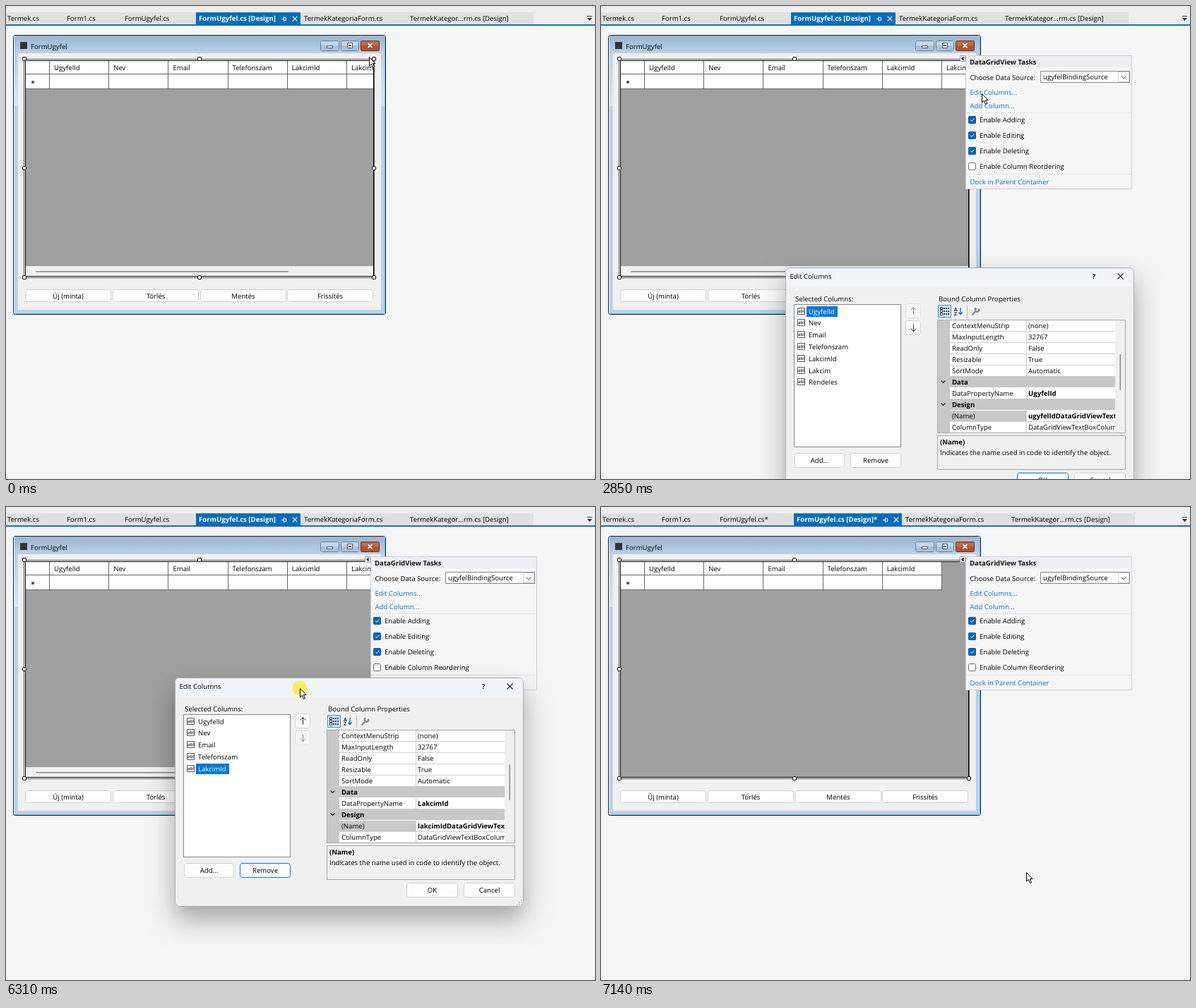
An HTML page with a canvas that plays this animation: 834 px wide and 671 px high, repeating every 7480 ms.

```html
<!DOCTYPE html>
<html>
<head>
<meta charset="utf-8">
<style>
html, body { margin: 0; width: 100%; height: 100%; overflow: hidden; background: #f5f5f5; }
canvas { display: block; }
</style>
</head>
<body>
<canvas id="stage" width="834" height="671"></canvas>
<script>
const g = document.getElementById('stage').getContext('2d');
const LOOP = 7480, STEP = 70;
const BLUE = '#006cbe', LINK = '#0f6cc4', FACE = '#f0f0f0';

// start time, number of steps, end point
const MOVES = [
  [70, 2, 510, 76], [1080, 4, 533, 129], [1560, 1, 536, 127], [1760, 1, 539, 124],
  [2920, 4, 430, 301], [3250, 9, 316, 513], [4060, 6, 368, 642],
  [5550, 4, 426, 418], [5830, 3, 438, 386], [6170, 5, 411, 226],
  [6520, 3, 571, 469], [6730, 3, 602, 518]
];
const CLICKS = [[470, 610], [2490, 2630], [3850, 3990], [4610, 4750], [5150, 5350], [6170, 6520], [6940, 7080]];
const COLUMNS = ['UgyfelId', 'Nev', 'Email', 'Telefonszam', 'LakcimId', 'Lakcim', 'Rendeles'];

const within = (t, a, b) => t >= a && t < b;

function fill(x, y, w, h, color, r = 0) {
  g.fillStyle = color;
  g.beginPath();
  g.roundRect(x, y, w, h, r);
  g.fill();
}

function box(x, y, w, h, color, border, r = 0) {
  if (color) fill(x, y, w, h, color, r);
  g.strokeStyle = border;
  g.lineWidth = 1;
  g.beginPath();
  g.roundRect(x + .5, y + .5, w - 1, h - 1, r);
  g.stroke();
}

function path(points, stroke, width = 1, color = null) {
  g.beginPath();
  for (let i = 0; i < points.length; i += 2) g.lineTo(points[i], points[i + 1]);
  if (color) { g.closePath(); g.fillStyle = color; g.fill(); }
  if (stroke) { g.strokeStyle = stroke; g.lineWidth = width; g.stroke(); }
}

// y is the middle of the capitals
function text(s, x, y, color = '#000', weight = 400, align = 'left') {
  g.font = `${weight} 9.6px "Open Sans", "Noto Sans", sans-serif`;
  g.textAlign = align;
  g.fillStyle = color;
  g.fillText(s, x, Math.round(y + 3.5));
}

function button(s, x, y, w, h, border = '#d0d0d0', color = '#fdfdfd', ink = '#000') {
  box(x, y, w, h, color, border, 3);
  text(s, x + w / 2, y + h / 2, ink, 400, 'center');
}

function cross(x, y, r, color, width = 1.2) {
  path([x - r, y - r, x + r, y + r], color, width);
  path([x + r, y - r, x - r, y + r], color, width);
}

function clipped(x, y, w, h, draw) {
  g.save();
  g.beginPath();
  g.rect(x, y, w, h);
  g.clip();
  draw();
  g.restore();
}

function pointer(t) {
  let x = 514, y = 72;
  for (const [start, steps, toX, toY] of MOVES) {
    if (t < start) break;
    const k = Math.min(steps, Math.floor((t - start) / STEP) + 1);
    const p = Math.sin(k / steps * Math.PI / 2);
    x += (toX - x) * p;
    y += (toY - y) * p;
  }
  return [Math.round(x), Math.round(y)];
}

function tabs(saved) {
  const star = saved ? '' : '*', left = saved ? 269 : 273, end = saved ? 417 : 426, shift = end - 417;
  fill(0, 0, 834, 28, '#eeeef0');
  fill(0, 9, 747 + shift, 17, '#e0e0e1');
  fill(0, 26, 834, 2, '#1672bd');
  fill(left, 9, end - left, 18, BLUE);
  text('Termek.cs', 2, 17.5);
  text('Form1.cs', 86, 17.5);
  text('FormUgyfel.cs' + star, 168, 17.5);
  text('FormUgyfel.cs [Design]' + star, left + 4, 17.5, '#fff', 700);
  text('TermekKategoriaForm.cs', 422 + shift, 17.5);
  text('TermekKategor...rm.cs [Design]', 572 + shift, 17.5);
  const pin = end - 27;
  path([pin, 18.5, pin + 3, 18.5], '#fff');
  path([pin + 3.5, 15, pin + 3.5, 22], '#fff');
  box(pin + 3, 16, 4, 5, null, '#fff');
  cross(end - 8, 18, 3.3, '#fff');
  fill(823, 14, 7, 1, '#333');
  path([823, 17, 830, 17, 826.5, 21], null, 1, '#333');
}

function handle(x, y) {
  box(x - 3, y - 3, 6, 6, '#fff', '#000', 1.5);
}

function form(t, saved) {
  const side = g.createLinearGradient(0, 41, 0, 142);
  side.addColorStop(0, '#98b4d1');
  side.addColorStop(.26, '#bcd1e8');
  side.addColorStop(1, '#d8e6f4');
  box(10, 41, 528, 397, '#b9d1ea', '#222', 3);
  fill(11, 42, 526, 100, side);
  fill(11, 44, 1, 392, '#e4f0fa');
  fill(536, 44, 1, 393, '#45cde8');
  fill(12, 436, 525, 1, '#45cde8');
  fill(17, 67, 514, 364, FACE);
  fill(20, 51, 10, 10, '#333');
  text('FormUgyfel', 35, 57);
  box(445, 49, 27, 15, '#c4d7eb', '#667d96', 2);
  box(474, 49, 26, 15, '#c4d7eb', '#667d96', 2);
  box(502, 49, 27, 15, '#c9683f', '#58302a', 2);
  fill(446, 56, 25, 7, '#a9c2dd');
  fill(475, 56, 24, 7, '#a9c2dd');
  fill(503, 56, 25, 7, '#b6512b');
  box(454, 56, 9, 4, '#fff', '#445');
  box(483, 52, 8, 8, '#fff', '#445');
  fill(485, 55, 4, 2, '#445');
  cross(515.5, 56, 3, '#444', 3.4);
  cross(515.5, 56, 3, '#fff', 1.8);

  box(25, 75, 497, 311, '#fff', '#555');
  box(27, 77, 494, 307, '#a0a0a0', '#000');
  const right = saved ? 520 : 483;
  fill(28, 78, right - 28, 40, '#fff');
  fill(28, 96, right - 28, 1, '#666');
  fill(28, 117, right - 28, 1, '#666');
  for (let i = 0; i < 6; i++) fill(Math.round(61 + i * 84.2), 78, 1, 40, '#666');
  clipped(28, 78, 492, 40, () => {
    COLUMNS.slice(0, saved ? 6 : 5).forEach((s, i) => text(s, 68 + i * 84.2, 87));
  });
  for (let a = 0; a < 3; a++) {
    const c = Math.cos(a * Math.PI / 3) * 2.5, s = Math.sin(a * Math.PI / 3) * 2.5;
    path([38 - c, 108 - s, 38 + c, 108 + s], '#222', 1);
  }
  if (saved) {
    fill(28, 369, 492, 14, FACE);
    fill(42, 376, 358, 1.5, '#858585', 1);
  }
  for (const x of [26, 274, 521.5]) for (const y of [75, 230, 385])
    if (x !== 274 || y !== 230) handle(Math.floor(x), y);
  if (t >= 70) {
    box(508, 70, 8, 9, '#fff', '#999');
    path([513.5, 71.5, 513.5, 77.5, 510, 74.5], null, 1, '#000');
  }
  [['Új (minta)', 27], ['Törlés', 151], ['Mentés', 275], ['Frissítés', 398]]
    .forEach(([s, x]) => button(s, x, 402, 122, 18));
}

function tasks(t) {
  box(516, 70, 236, 190, '#f6f6f7', '#cccedb');
  fill(517, 71, 234, 16, '#eeeef2');
  text('DataGridView Tasks', 522, 79, '#111', 700);
  text('Choose Data Source:', 522.5, 101);
  box(622, 92, 127, 17, '#fff', '#868686');
  box(732, 93, 16, 15, '#fff', '#d0d0d0');
  text('ugyfelBindingSource', 626, 100);
  path([736.5, 99.5, 740, 103, 743.5, 99.5], '#444');
  const hover = within(t, 1290, 2630);
  text('Edit Columns...', 522.5, 122.5, hover ? '#111' : LINK);
  if (hover) fill(523, 128, 67, 1, '#111');
  text('Add Column...', 522.5, 141, LINK);
  fill(517, 151, 234, 1, '#e2e3ea');
  ['Adding', 'Editing', 'Deleting', 'Column Reordering'].forEach((s, i) => {
    const y = 161 + i * 22;
    box(520, y - 5, 11, 11, i < 3 ? '#0062b8' : '#fff', i < 3 ? '#0062b8' : '#666', 2);
    if (i < 3) path([523, y + .5, 525, y + 2.5, 528.5, y - 1.5], '#fff');
    text('Enable ' + s, 536, y);
  });
  fill(517, 238, 234, 1, '#e2e3ea');
  text('Dock in Parent Container', 522.5, 249, LINK);
}

function arrowButton(y, dir, enabled) {
  const ink = enabled ? '#222' : '#888';
  box(170, y, 22, 21, enabled ? '#fdfdfd' : '#f6f6f6', enabled ? '#d0d0d0' : '#e2e2e2', 3);
  const m = y + 10.5;
  path([181.5, m - 5, 181.5, m + 5], ink);
  path([177.5, m + dir, 181.5, m + 5 * dir, 185.5, m + dir], ink);
}

function propertyGrid(name) {
  const field = name[0].toLowerCase() + name.slice(1) + 'DataGridViewTextBoxColumn';
  const rows = [
    ['ContextMenuStrip', '(none)'], ['MaxInputLength', '32767'], ['ReadOnly', 'False'],
    ['Resizable', 'True'], ['SortMode', 'Automatic'], ['Data'], ['DataPropertyName', name, 700],
    ['Design'], ['(Name)', field, 700], ['ColumnType', 'DataGridViewTextBoxColumn']
  ];
  box(215, 74, 267, 161, FACE, '#a8a8a8');
  clipped(216, 75, 251, 159, () => {
    fill(216, 75, 251, 160, '#fff');
    fill(216, 75, 17, 160, '#c8c8c8');
    rows.forEach(([label, value, weight], i) => {
      const y = 75 + i * 16, m = y + 7.5;
      if (!value) {
        fill(216, y - 1, 251, 16, '#c8c8c8');
        path([220.5, m - 2, 223.5, m + 1, 226.5, m - 2], '#222', 1.2);
        text(label, 236, m, '#000', 700);
        return;
      }
      if (label === '(Name)') fill(233, y, 108, 15, '#c8c8c8');
      fill(233, y + 15, 234, 1, '#cfcfcf');
      fill(341, y, 1, 16, '#cfcfcf');
      text(label, 236, m);
      text(value, 344, m, '#000', weight);
    });
  });
  fill(473.5, 123, 1.5, 51, '#858585', 1);
  box(215, 238, 267, 49, FACE, '#a8a8a8');
  text('(Name)', 219, 247, '#000', 700);
  text('Indicates the name used in code to identify the object.', 219, 262);
}

function dialog(t, dx, dy) {
  const opening = Math.min(1, (Math.floor((t - 2630) / STEP) + 1) / 3);
  const shown = t >= 7010 ? .5 : opening, scale = .9 + .1 * shown;
  const list = t < 4680 ? COLUMNS : t < 5220 ? COLUMNS.filter(s => s !== 'Lakcim') : COLUMNS.slice(0, 5);
  const chosen = t < 3850 ? 0 : t < 5220 ? 5 : 4;
  const focused = t >= 4680, hover = within(t, 4410, 5550);

  g.save();
  g.globalAlpha = shown;
  g.translate(261 + dx + 247, 371 + dy + 162);
  g.scale(scale, scale);
  g.translate(-247, -162);

  g.save();
  g.shadowColor = 'rgba(0,0,0,.33)';
  g.shadowBlur = 36;
  g.shadowOffsetY = 18;
  fill(0, 0, 494, 325, FACE, 7);
  g.restore();
  box(0, 0, 494, 325, FACE, '#a9abb0', 7);
  fill(1, 1, 492, 26, '#f1f4fa', [6, 6, 0, 0]);
  text('Edit Columns', 6.5, 12.5);
  text('?', 437, 12.5, '#000', 600, 'center');
  cross(474.5, 12.5, 4, '#222', 1.1);

  text('Selected Columns:', 14, 44);
  text('Bound Column Properties', 217, 44);
  box(12, 52, 152, 203, '#fff', '#828790');
  list.forEach((s, i) => {
    const y = Math.round(61.5 + i * 16.8), on = i === chosen;
    box(17, y - 5, 11, 10, '#fff', '#555');
    g.font = '600 6px "Open Sans", sans-serif';
    g.fillStyle = '#222';
    g.textAlign = 'center';
    g.fillText('abl', 22.5, y + 2);
    if (on) {
      g.font = '9.6px "Open Sans", "Noto Sans", sans-serif';
      fill(30, y - 7, Math.round(g.measureText(s).width) + 7, 15, '#0078d7');
    }
    text(s, 33, y, on ? '#fff' : '#000');
  });
  arrowButton(51, -1, chosen > 0);
  arrowButton(75, 1, chosen < list.length - 1);

  box(216, 53, 19, 18, '#cce4f7', '#3a8fd6');
  for (let i = 0; i < 3; i++) {
    box(219, 56 + i * 4, 4, 4, '#fff', '#333');
    for (let j = 0; j < 3; j++) fill(224 + j * 3, 57 + i * 4, 2, 2, '#444');
  }
  g.font = '700 7px "Open Sans", sans-serif';
  g.textAlign = 'left';
  g.fillStyle = '#222';
  g.fillText('A', 239, 62);
  g.fillText('Z', 239, 68);
  path([248, 57, 248, 66], '#0067b8', 1.3);
  path([245.5, 63.5, 248, 66.5, 250.5, 63.5], '#0067b8', 1.3);
  fill(257, 54, 1, 17, '#b8b8b8');
  path([264.5, 67.5, 270, 61.5], '#8a8a8a', 2.4);
  g.beginPath();
  g.arc(271.5, 60, 2.7, -.5, 4.2);
  g.stroke();

  propertyGrid(list[chosen]);
  button('Add...', 13, 263, 71, 21);
  button('Remove', 92, 263, 72, 21, focused || hover ? '#0078d4' : '#d0d0d0', hover ? '#e8f3fb' : '#fdfdfd');
  button('OK', 328, 291, 73, 21, focused ? '#d0d0d0' : '#0078d4');
  button('Cancel', 409, 291, 73, 21);
  for (let i = 0; i < 3; i++)
    for (let j = 0; j <= i; j++) fill(490 - j * 3, 315 + i * 3, 1.5, 1.5, '#b5b5b5');
  g.restore();
}

function cursor(t, x, y) {
  if (CLICKS.some(([a, b]) => within(t, a, b))) {
    g.fillStyle = 'rgba(250,232,0,.62)';
    g.beginPath();
    g.arc(x, y, 10.5, 0, 7);
    g.fill();
  }
  g.save();
  g.translate(x, y);
  g.lineJoin = 'round';
  if (within(t, 1290, 2560)) {
    path([-.5, .5, 1, .5, 1.5, 5.5, 4, 5.5, 4.5, 6.5, 6.5, 6.5, 7, 7.5, 8.5, 8, 9, 9.5, 8.5, 13,
      7, 17.5, -1, 17.5, -2, 14.5, -4.5, 10.5, -3.5, 9, -1.5, 11, -1.5, 1.5, -.5, .5], '#000', 1, '#fff');
    for (const k of [1.5, 4, 6.5]) path([k, 6, k, 9], '#000', .8);
  } else {
    path([.5, .5, .5, 13, 3.4, 10.3, 5.5, 15.5, 7.5, 14.6, 5.4, 9.6, 9, 9.6, .5, .5], '#000', 1, '#fff');
  }
  g.restore();
}

function draw(t) {
  const [x, y] = pointer(t), saved = t < 7080;
  g.textRendering = 'geometricPrecision';
  fill(0, 0, 834, 671, '#f5f5f5');
  tabs(saved);
  form(t, saved);
  if (t >= 540) tasks(t);
  if (within(t, 2630, 7080)) {
    const [dx, dy] = t < 6170 ? [0, 0] : t < 6520 ? [x - 438, y - 386] : [-27, -160];
    dialog(t, dx, dy);
  }
  cursor(t, x, y);
}

const begin = performance.now();
function frame() {
  draw((performance.now() - begin) % LOOP);
  requestAnimationFrame(frame);
}
frame();
</script>
</body>
</html>
```
